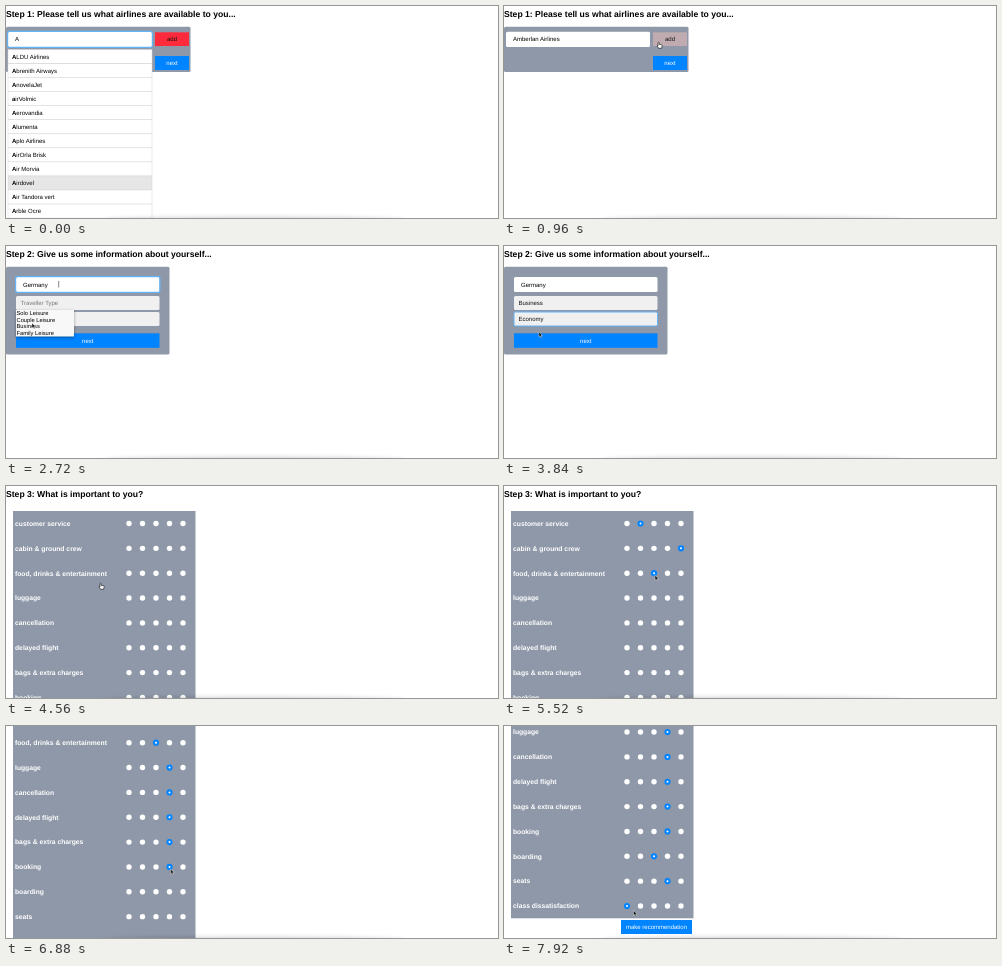
An HTML page that plays this animation: 492 by 212 pixels, repeating every 8 s.

```html
<!DOCTYPE html>
<html lang="en">
<head>
<meta charset="utf-8">
<title>Airline finder</title>
<style>
  html, body { margin: 0; width: 100%; height: 100%; overflow: hidden; background: #fff; }
  svg { display: block; width: 492px; height: 212px; font: 6px "Liberation Sans", Arial, sans-serif; text-rendering: geometricPrecision; }
</style>
</head>
<body>
<svg id="stage" viewBox="0 0 492 212"></svg>
<script>
const LOOP = 8000, STEP = 80;
const PANEL = '#8f98a8', BLUE = '#0084ff', RED = '#ff2b3c';
const stage = document.getElementById('stage');

const airlines = ['ALDU Airlines', 'Abrenith Airways', 'AnovelaJet', 'airVolmic', 'Aerovandia', 'Alumenta',
  'Aplo Airlines', 'AirOrla Brisk', 'Air Morvia', 'Airdovel', 'Air Tandora vert', 'Arble Ocre'];
const chosenAirline = 'Amberlan Airlines';
const travellerTypes = ['Solo Leisure', 'Couple Leisure', 'Business', 'Family Leisure'];
const cabinClasses = ['Economy', 'Premium Economy', 'Business Class', 'First Class'];

// label, chosen column, click time
const ratings = [
  ['customer service', 1, 4960], ['cabin & ground crew', 4, 5200],
  ['food, drinks & entertainment', 2, 5440], ['luggage', 3, 5760],
  ['cancellation', 3, 6000], ['delayed flight', 3, 6240],
  ['bags & extra charges', 3, 6560], ['booking', 3, 6800],
  ['boarding', 2, 7200], ['seats', 3, 7440], ['class dissatisfaction', 0, 7760]
];
const columnX = c => 123 + 13.5 * c;
const rowY = r => 37.5 + 24.85 * r;

function scrollAt(t) {
  if (t < 5600) return 0;
  if (t < 5680) return 17;
  if (t < 6320) return 34.5;
  if (t < 6400) return 54;
  return t < 7040 ? 70.5 : 106;
}

// time, x, y of the pointer tip; it rests on each dot around its click
const pointerPath = [
  [560, 32, 53], [640, 32, 53], [880, 155, 37], [1120, 155, 37], [1440, 164, 57], [1680, 164, 57],
  [1920, 40, 38], [2480, 40, 38], [2640, 26, 77], [2880, 26, 77], [3200, 34, 73], [3360, 34, 73],
  [3600, 30, 85], [3760, 30, 85], [4240, 95, 96], [4400, 95, 98], [4480, 95, 98], [4720, 95, 98],
  ...ratings.flatMap(([, c, t], r) => [t - 80, t + 80].map(
    k => [k, columnX(c) + 1, rowY(r) - scrollAt(t) + 2])),
  [7920, 129.5, 184.5]
];

function pointerAt(t) {
  const i = pointerPath.findIndex(key => key[0] > t);
  if (i < 0) return pointerPath.at(-1).slice(1);
  const [t0, x0, y0] = pointerPath[i - 1], [t1, x1, y1] = pointerPath[i];
  const u = (t - t0) / (t1 - t0), e = u * u * (3 - 2 * u);
  return [x0 + (x1 - x0) * e, y0 + (y1 - y0) * e];
}

const safe = s => s.replace(/&/g, '&amp;');
const rect = (x, y, w, h, fill, more = '') =>
  `<rect x="${x}" y="${y}" width="${w}" height="${h}" fill="${fill}" ${more}/>`;
const text = (x, y, s, more = '') => `<text x="${x}" y="${y}" ${more}>${s}</text>`;
const title = (s, y = 11.2) => text(0, y, s, 'font-size="8.62" font-weight="bold"');
const button = (x, y, w, h, label, fill, ink = '#fff') =>
  rect(x, y, w, h, fill) + text(x + w / 2, y + h / 2 + 2, label, `fill="${ink}" text-anchor="middle"`);

function input(x, y, w, h, value, focused, fill = '#fff') {
  const glow = focused ? rect(x - .4, y - .4, w + .8, h + .8, 'none', 'rx="1.6" stroke="#63b4f5" stroke-width="1.2"') : '';
  return rect(x, y, w, h, fill, 'rx="1.5"') + glow + text(x + 7, y + h / 2 + 2, value);
}

function suggestions(items, typed, hovered) {
  return items.map((name, i) => {
    const y = 43.5 + 14.05 * i;
    return rect(2, y, 144, 14.05, i === hovered ? '#e6e6e6' : '#fff', 'stroke="#d6d6d6" stroke-width=".5"') +
      text(6, y + 9.2, `<tspan font-weight="bold">${name.slice(0, typed)}</tspan>${name.slice(typed)}`);
  }).join('');
}

function airlineStep(t) {
  const typed = t < 240 ? 1 : t < 400 ? 2 : 3;
  const listOpen = t < 640;
  const value = t >= 1120 ? '' : chosenAirline.slice(0, listOpen ? typed : undefined);
  const overAdd = t >= 800 && t < 1280;
  return title('Step 1: Please tell us what airlines are available to you...') +
    rect(0, 20.7, 184.5, 45.3, PANEL, 'rx="1.5"') +
    input(2, 25.8, 144, 15.2, value, listOpen) +
    button(149, 26.3, 34, 13.7, 'add', overAdd ? '#bfabb0' : RED, '#111') +
    button(149, 50, 34, 14, 'next', BLUE) +
    (listOpen ? suggestions(typed === 1 ? airlines : [chosenAirline], typed, typed === 1 ? 9 : -1) : '');
}

function popup(y, items) {
  return rect(10, y, 58, 26.5, '#f8f8f8', 'style="filter:drop-shadow(0 1px 1.5px #0006)"') +
    items.map((s, i) => text(10.5, y + 5.3 + 6.45 * i, s, 'font-size="5.75"')).join('');
}

function choice(y, value, hint, focused) {
  return rect(10, y, 143.5, 14, '#f0f0f0', 'rx="1.5"' + (focused ? ' stroke="#63b4f5"' : '')) +
    text(14.5, y + 9.2, value || hint, `fill="${value ? '#111' : '#777'}"`);
}

function profileStep(t) {
  const letters = Math.max(0, Math.floor((t - 1920) / 80));
  const country = 'Germany'.slice(0, letters);
  const inCountry = t >= 1920 && t < 2880;
  const caret = inCountry ? rect(17.6 + letters * 3.5, 35, .5, 6.5, '#111') : '';
  return title('Step 2: Give us some information about yourself...') +
    rect(0, 20.7, 163.5, 87.7, PANEL, 'rx="1.5"') +
    input(10, 31, 143.5, 15, country, inCountry) + caret +
    choice(50, t >= 2880 ? 'Business' : '', 'Traveller Type', t >= 2880 && t < 3360) +
    choice(66, t >= 3760 ? 'Economy' : '', 'Cabin Class', t >= 3360 && t < 4400) +
    button(10, 87.3, 143.5, 14.5, 'next', BLUE) +
    (t >= 2640 && t < 2880 ? popup(64, travellerTypes) : '') +
    (t >= 3360 && t < 3760 ? popup(80, cabinClasses) : '');
}

function dot(x, y, selected) {
  return selected
    ? `<circle cx="${x}" cy="${y}" r="3.1" fill="${BLUE}"/><circle cx="${x}" cy="${y}" r="1" fill="#fff"/>`
    : `<circle cx="${x}" cy="${y}" r="2.7" fill="#fff"/>`;
}

function ratingStep(t) {
  const rows = ratings.map(([label, choice, time], r) =>
    text(9, rowY(r) + 2.3, safe(label), 'font-size="6.75" font-weight="bold" fill="#fff"') +
    [0, 1, 2, 3, 4].map(c => dot(columnX(c), rowY(r), c === choice && t >= time)).join('')).join('');
  return `<g transform="translate(0 ${-scrollAt(t)})">` +
    title('Step 3: What is important to you?') +
    rect(7, 25, 182.5, 273.3, PANEL) + rows +
    button(117, 300, 71, 14, 'make recommendation', BLUE) + '</g>';
}

function pointer(t) {
  if (t < 560) return '';
  const hand = (t >= 800 && t < 1680) || (t >= 4160 && t < 4720);
  const shape = hand
    ? '<path d="M-1 3V-.5Q-.4-1.2.2-.5V1.3L2.6 1.8Q3.4 2 3.2 3L2.6 5.3H-.4L-2 3Q-1.8 2.2-1 3Z" fill="#fff" stroke="#222" stroke-width=".7"/>'
    : '<path d="M0 0V5L1.2 4L2 5.8L2.9 5.4L2.1 3.7H3.6Z" fill="#111" stroke="#fff" stroke-width=".4"/>';
  return `<g transform="translate(${pointerAt(t)})">${shape}</g>`;
}

const bottomShade = '<ellipse cx="248" cy="214" rx="152" ry="3.2" fill="#000" opacity=".16" style="filter:blur(2px)"/>';

function draw(now) {
  const t = Math.floor(now % LOOP / STEP) * STEP;
  const page = t < 1680 ? airlineStep : t < 4480 ? profileStep : ratingStep;
  stage.innerHTML = page(t) + bottomShade + pointer(t);
}

const start = performance.now();
function tick() {
  draw(performance.now() - start);
  requestAnimationFrame(tick);
}
tick();
</script>
</body>
</html>
```
